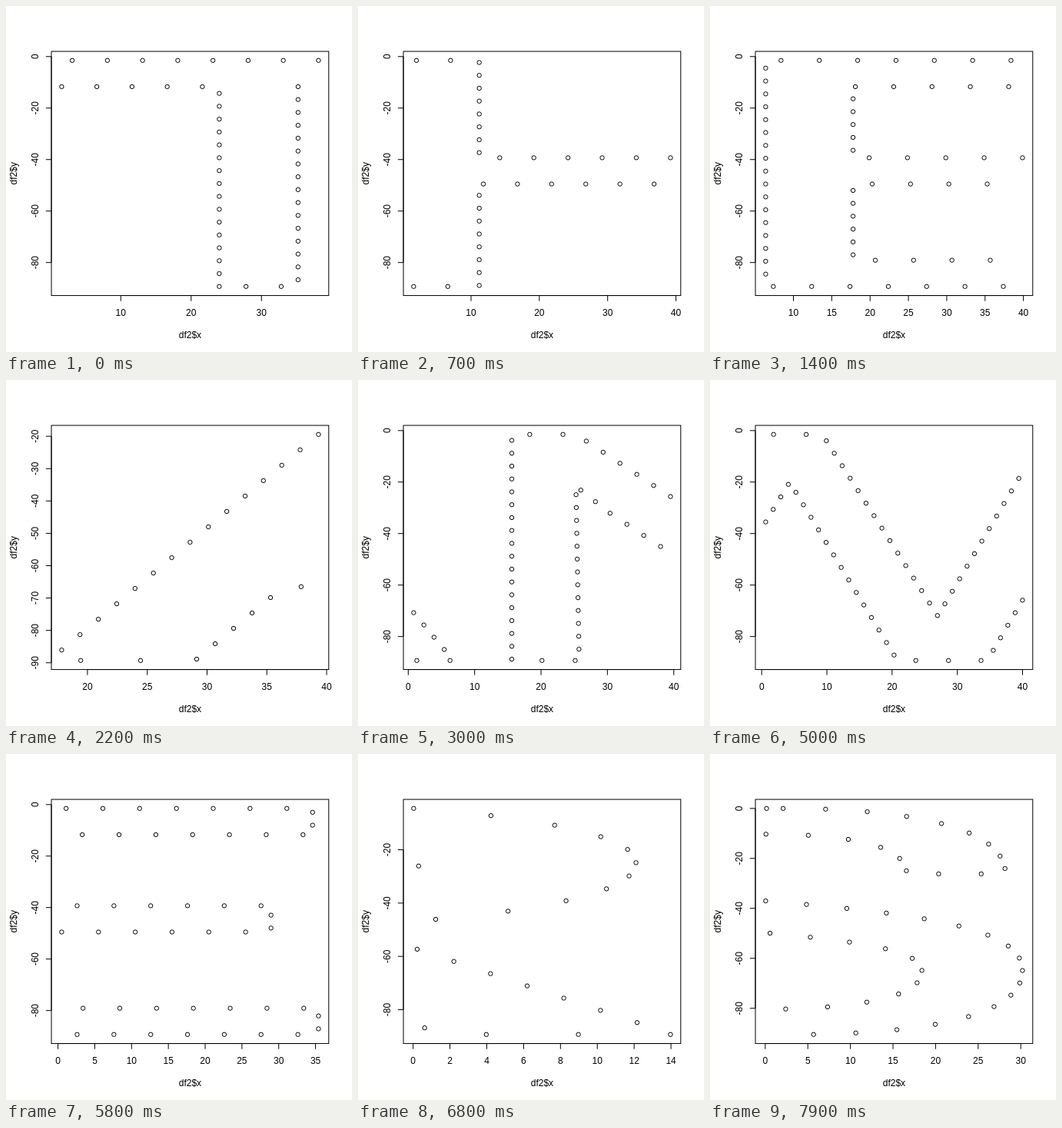
Recreate the animation shown at these times as an HTML page with a canvas. Size 450 by 450 pixels, loop 8000 ms.

```html
<!DOCTYPE html>
<html lang="en">
<head>
<meta charset="utf-8">
<title>Scrolling scatter plot</title>
<style>
html, body { margin: 0; width: 100%; height: 100%; overflow: hidden; background: #fff; }
canvas { display: block; }
</style>
</head>
<body>
<canvas id="plot" width="450" height="450"></canvas>
<script>
const ctx = document.getElementById('plot').getContext('2d');
const STEP_MS = 100, STEPS = 80, SHIFT = 10, WINDOW = 40, GAP = 5;
const LEFT = 59.04, RIGHT = 419.76, TOP = 59.04, BOTTOM = 376.56;

// Letter outlines, measured down from the top of the line.
const glyphs = {
  T: 'M24 89.3V11.7H-.05V1.5H59.05V11.7H35.2V89.3Z',
  H: 'M0 89.3V1.5H11.4V39.3H46.6V1.5H58V89.3H46.6V49.5H11.4V89.3Z',
  E: 'M0 89.3V1.5H49.25V11.7H11.4V39.3H43.6V49.5H11.4V79.1H50.05V89.3Z',
  A: 'M0 89.3L28.3 1.5H41.7L70 89.3H57.8L50.4 66.5H19.6L12.2 89.3Z M22.7 57L35 14L47.3 57Z',
  N: 'M0 89.3V1.5H9.7L43.35 58.7L48.5 68.26L48 1.5H58.15V89.3H48.45L14.8 32.1L9.65 21.6L10.15 89.3Z',
  S: 'M29.9 0C45.5 0 56 8.2 56 26.2H44.4C44.4 15.5 38.5 10.3 27.9 10.3C8 10.3 9 30 27 36.7' +
     'M27.85 37C45 42 58 47 58 64.8C58 83 47 90.6 30 90.6' +
     'M30.2 80.3C39.5 79.5 46.2 75 46.2 65.2C46.2 57 39.5 53.5 28.6 50C16 46 2 42 2 24C2 8 15 0 29 0' +
     'M27.5 90.6C11 90.6 .5 81 .5 64.4H12C12 74 18 80.3 27.5 80.3',
  W: 'M20.2 89.3L0 1.5H11.8L27.8 72L45.5 1.5H55.5L73.2 72L89.6 1.5H101L80.8 89.3H67L50.5 20L34 89.3Z',
  R: 'M51.03 4.5C59 8.5 63.1 16 63.1 24.8C63.1 37 57 44.8 47.4 48.5L65.1 89.3H52.7L36.9 52.4H11.4V89.3H0V2C14 .5 35 -.5 51 4.5' +
     'M51.3 26.1C50 38 42 43.7 28 43.7H11.4V11C40 9 49 14 50.5 20',
  I: 'M0 89.3V1.5H11.4V89.3Z'
};

// Points at equal distances along each outline.
function place(letter, left, start = 0) {
  const out = [];
  for (const d of glyphs[letter].match(/M[^M]+/g)) {
    const path = document.createElementNS('http://www.w3.org/2000/svg', 'path');
    path.setAttribute('d', d);
    const length = path.getTotalLength();
    for (let s = start; s < length; s += GAP) {
      const p = path.getPointAtLength(s);
      out.push({ x: left + p.x, y: -p.y });
    }
  }
  return out;
}

const dots = [
  place('T', 0), place('H', 69.8), place('E', 146.38, 4.8),
  place('A', 236.8, 3.4), place('N', 315.6, .5), place('S', 389, 4.4),
  place('W', 453.8, 4.4), place('E', 565.35, 3.55), place('R', 629),
  place('I', 738), place('S', 762.2)
].flat();

// Axis limits with a 4% margin, plus round tick values.
function makeAxis(values) {
  let lo = Math.min(...values), hi = Math.max(...values);
  const pad = hi - lo < 1e-3 ? .432 * Math.abs(hi) : .04 * (hi - lo);
  lo -= pad;
  hi += pad;
  const cell = (hi - lo) / 5, base = 10 ** Math.floor(Math.log10(cell));
  let unit = base;
  for (const [factor, bias] of [[2, .8], [5, 1.7], [10, .8]]) {
    if (factor * base - cell >= bias * (cell - unit)) break;
    unit = factor * base;
  }
  const ticks = [];
  for (let k = Math.ceil(lo / unit); k * unit <= hi; k++) ticks.push(k * unit || 0);
  const digits = Math.max(0, -Math.floor(Math.log10(unit) + 1e-9));
  return { ticks, label: v => v.toFixed(digits), part: v => (v - lo) / (hi - lo) };
}

function segment(x1, y1, x2, y2) {
  ctx.beginPath();
  ctx.moveTo(x1, y1);
  ctx.lineTo(x2, y2);
  ctx.stroke();
}

function upright(text, x, y) {
  ctx.save();
  ctx.translate(x, y);
  ctx.rotate(-Math.PI / 2);
  ctx.fillText(text, 0, 0);
  ctx.restore();
}

function draw(step) {
  const shown = dots
    .map(({ x, y }) => ({ x: x - step * SHIFT, y }))
    .filter(({ x }) => x > 0 && x <= WINDOW);
  ctx.fillStyle = '#fff';
  ctx.fillRect(0, 0, 450, 450);
  ctx.fillStyle = ctx.strokeStyle = '#000';
  ctx.lineWidth = 1;
  ctx.font = '12px "Liberation Sans", Arial, sans-serif';
  ctx.textAlign = 'center';
  ctx.strokeRect(LEFT, TOP, RIGHT - LEFT, BOTTOM - TOP);
  ctx.fillText('df2$x', 239.4, 432);
  upright('df2$y', 13.5, 217.8);
  if (!shown.length) return;

  const ax = makeAxis(shown.map(p => p.x)), ay = makeAxis(shown.map(p => p.y));
  const px = v => LEFT + ax.part(v) * (RIGHT - LEFT);
  const py = v => BOTTOM - ay.part(v) * (BOTTOM - TOP);
  segment(px(ax.ticks[0]), BOTTOM, px(ax.ticks.at(-1)), BOTTOM);
  segment(LEFT, py(ay.ticks[0]), LEFT, py(ay.ticks.at(-1)));
  for (const v of ax.ticks) {
    segment(px(v), BOTTOM, px(v), BOTTOM + 7.2);
    ctx.fillText(ax.label(v), px(v), 403);
  }
  for (const v of ay.ticks) {
    segment(LEFT - 7.2, py(v), LEFT, py(v));
    upright(ay.label(v), 42, py(v));
  }
  for (const { x, y } of shown) {
    ctx.beginPath();
    ctx.arc(px(x), py(y), 2.7, 0, 2 * Math.PI);
    ctx.stroke();
  }
}

const began = performance.now();
function tick() {
  draw(Math.floor((performance.now() - began) / STEP_MS) % STEPS);
  requestAnimationFrame(tick);
}
tick();
</script>
</body>
</html>
```
